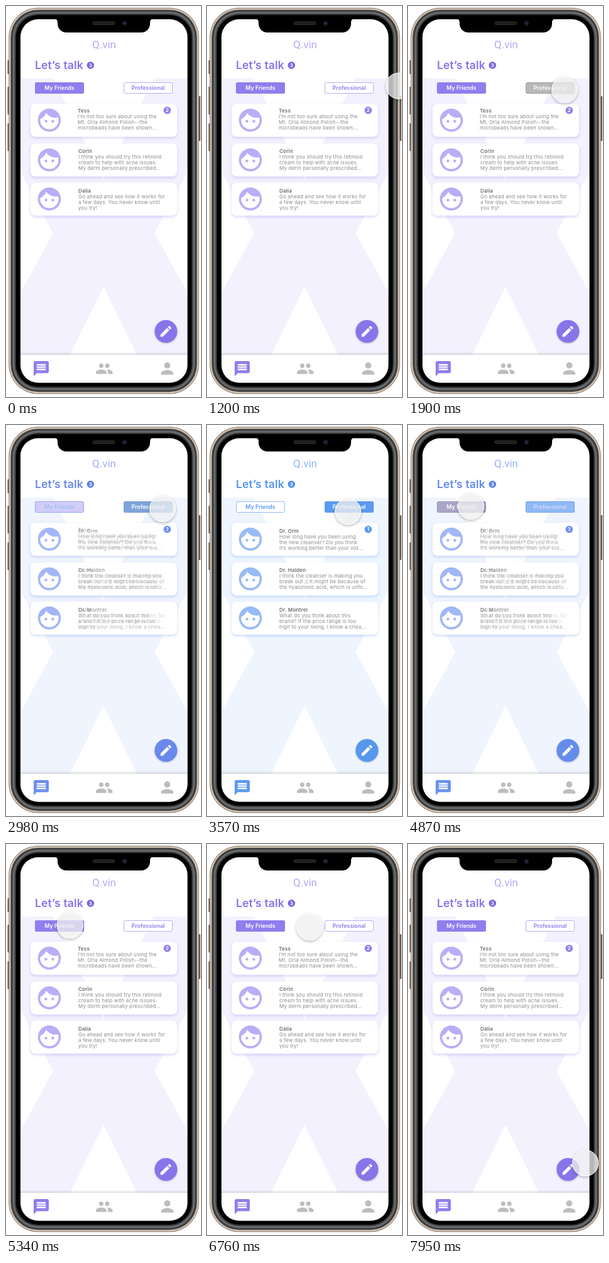
Recreate the animation shown at these times as an HTML page with a canvas. Size 310 by 620 pixels, loop 8 s.

```html
<!DOCTYPE html>
<html lang="en">
<head>
<meta charset="utf-8">
<title>Chat tabs</title>
<style>
  html, body { margin: 0; width: 100%; height: 100%; overflow: hidden; background: #fff; }
  canvas { display: block; width: 310px; height: 620px; }
</style>
</head>
<body>
<canvas id="stage"></canvas>
<script>
const W = 310, H = 620, LOOP = 8000;
const SANS = 'Inter, "Open Sans", sans-serif';
const scale = window.devicePixelRatio || 1;

const ICONS = {
  face: 'M9 11.75c-.69 0-1.25.56-1.25 1.25s.56 1.25 1.25 1.25 1.25-.56 1.25-1.25-.56-1.25-1.25-1.25zm6 0c-.69 0-1.25.56-1.25 1.25s.56 1.25 1.25 1.25 1.25-.56 1.25-1.25-.56-1.25-1.25-1.25zM12 2C6.48 2 2 6.48 2 12s4.48 10 10 10 10-4.48 10-10S17.52 2 12 2zm0 18c-4.41 0-8-3.59-8-8 0-.29.02-.58.05-.86 2.36-1.05 4.23-2.98 5.21-5.37C11.07 8.33 14.05 10 17.42 10c.78 0 1.53-.09 2.25-.26.21.71.33 1.47.33 2.26 0 4.41-3.59 8-8 8z',
  pencil: 'M3 17.25V21h3.75L17.81 9.94l-3.75-3.75L3 17.25zM20.71 7.04c.39-.39.39-1.02 0-1.41l-2.34-2.34c-.39-.39-1.02-.39-1.41 0l-1.83 1.83 3.75 3.75 1.83-1.83z',
  chat: 'M20 2H4c-1.1 0-2 .9-2 2v18l4-4h14c1.1 0 2-.9 2-2V4c0-1.1-.9-2-2-2zm-2 12H6v-2h12v2zm0-3H6V9h12v2zm0-3H6V6h12v2z',
  group: 'M16 11c1.66 0 3-1.34 3-3s-1.34-3-3-3-3 1.34-3 3 1.34 3 3 3zm-8 0c1.66 0 3-1.34 3-3S9.66 5 8 5 5 6.34 5 8s1.34 3 3 3zm0 2c-2.33 0-7 1.17-7 3.5V19h14v-2.5c0-2.33-4.67-3.5-7-3.5zm8 0c-.29 0-.62.02-.97.05C16.19 13.89 17 15.02 17 16.5V19h6v-2.5c0-2.33-4.67-3.5-7-3.5z',
  person: 'M12 12c2.21 0 4-1.79 4-4s-1.79-4-4-4-4 1.79-4 4 1.79 4 4 4zm0 2c-2.67 0-8 1.34-8 4v2h16v-2c0-2.66-5.33-4-8-4z'
};

const TABS = [{ label: 'My Friends', x: 46 }, { label: 'Professional', x: 187 }];
const CARD_Y = [155, 218, 280];

const THEMES = [{
  accent: '#8f7eed', title: '#8775ea', badge: '#7764dc', light: '#b9aef6',
  logo: '#b4a8f4', back: '#f3f1fe', shadow: 'rgba(130,110,235,.3)',
  unread: '2', nameY: [168.7, 232.7, 295.7], textX: [114, 115, 115],
  chats: [
    ['Tess', 'I’m not too sure about using the', 'Mt. Orla Almond Polish--the', 'microbeads have been shown...'],
    ['Corin', 'I think you should try this retinoid', 'cream to help with acne issues.', 'My derm personally prescribed...'],
    ['Dalia', 'Go ahead and see how it works for', 'a few days. You never know until', 'you try!']
  ]
}, {
  accent: '#5b9af0', title: '#5797ee', badge: '#4f90e8', light: '#97bcf6',
  logo: '#8db6f4', back: '#eef5fe', shadow: 'rgba(80,140,235,.3)',
  unread: '1', nameY: [170.5, 232.7, 295.7], textX: [115, 115, 115],
  chats: [
    ['Dr. Orm', 'How long have you been using', 'the new cleanser? Do you think', 'it’s working better than your old...'],
    ['Dr. Halden', 'I think the cleanser is making you', 'break out ;( It might be because of', 'the hyaluronic acid, which is unfo...'],
    ['Dr. Montrel', 'What do you think about this', 'brand? If the price range is too', 'high to your liking, I know a chea...']
  ]
}];

function makeCanvas(canvas) {
  canvas.width = W * scale;
  canvas.height = H * scale;
  const g = canvas.getContext('2d');
  g.scale(scale, scale);
  return g;
}

function box(g, x, y, w, h, r, fill, stroke) {
  g.beginPath();
  g.roundRect(x, y, w, h, r);
  if (fill) { g.fillStyle = fill; g.fill(); }
  if (stroke) { g.strokeStyle = stroke; g.lineWidth = 1; g.stroke(); }
}

function disc(g, x, y, r, fill) {
  g.beginPath();
  g.arc(x, y, r, 0, 7);
  g.fillStyle = fill;
  g.fill();
}

function poly(g, fill, ...pts) {
  g.beginPath();
  for (let i = 0; i < pts.length; i += 2) g.lineTo(pts[i], pts[i + 1]);
  g.fillStyle = fill;
  g.fill();
}

function text(g, str, x, y, font, fill, align = 'left', spacing = 0) {
  g.font = font;
  g.letterSpacing = spacing + 'px';
  g.textAlign = align;
  g.fillStyle = fill;
  g.fillText(str, x, y);
}

function icon(g, name, x, y, size, fill) {
  g.save();
  g.translate(x, y);
  g.scale(size, size);
  g.fillStyle = fill;
  g.fill(new Path2D(ICONS[name]), 'evenodd');
  g.restore();
}

function withShadow(g, color, blur, dy, draw) {
  g.save();
  g.shadowColor = color;
  g.shadowBlur = blur * scale;
  g.shadowOffsetY = dy * scale;
  draw();
  g.restore();
}

function badge(g, x, y, label, fill) {
  disc(g, x, y, 5.8, fill);
  text(g, label, x, y + 2.9, `700 8px ${SANS}`, '#fff', 'center');
}

function drawTab(g, theme, i, active, hover) {
  const { x, label } = TABS[i];
  if (active) box(g, x, 121, 78, 18, 2.5, theme.accent);
  else if (hover) box(g, x + .5, 121.5, 77, 17, 2.5, '#b8b8b8', '#9d9d9d');
  else box(g, x + .5, 121.5, 77, 17, 2.5, '#fff', theme.light);
  const ink = active || hover ? '#fff' : theme.accent;
  text(g, label, x + 39, 133.2, `600 8.8px ${SANS}`, ink, 'center');
}

function drawCard(g, theme, i) {
  const y = CARD_Y[i], x = theme.textX[i], base = theme.nameY[i];
  withShadow(g, theme.shadow, 4, 2, () => box(g, 39, y, 233, 52.5, 8, '#fff'));
  icon(g, 'face', 47, y + 4, 1.83, theme.light);
  const [name, ...lines] = theme.chats[i];
  text(g, name, x, base, `600 8px ${SANS}`, '#6c6c6c', 'left', .2);
  lines.forEach((line, k) =>
    text(g, line, x, base + 9.2 * (k + 1), `400 8px ${SANS}`, '#8a8a8a', 'left', .19));
}

function drawApp(g, mode, hover) {
  const theme = THEMES[mode];
  g.fillStyle = '#fff';
  g.fillRect(0, 0, W, H);
  g.fillStyle = theme.back;
  g.fillRect(23, 115, 266, 438);
  poly(g, '#fff', 75, 115, 235, 115, 155, 277);
  poly(g, '#fff', 102, 553, 208, 553, 155, 445);
  poly(g, '#fff', 23, 263, 75, 360, 23, 455);
  poly(g, '#fff', 289, 263, 236, 360, 289, 455);

  text(g, 'Q.vin', 156, 67, '400 17px Roboto, sans-serif', theme.logo, 'center');
  text(g, 'Let’s talk', 46, 100, `600 17.6px ${SANS}`, theme.title, 'left', .12);
  badge(g, 134.3, 94, '3', theme.badge);
  TABS.forEach((_, i) => drawTab(g, theme, i, i === mode, i === hover));
  CARD_Y.forEach((_, i) => drawCard(g, theme, i));
  badge(g, 256.3, 165.5, theme.unread, theme.accent);

  withShadow(g, 'rgba(0,0,0,.25)', 3, 1, () => disc(g, 254.3, 516, 18, theme.title));
  icon(g, 'pencil', 242.8, 504.5, .95, '#fff');

  withShadow(g, 'rgba(0,0,0,.22)', 4, -1, () => {
    g.fillStyle = '#fff';
    g.fillRect(15, 553, 282, 50);
  });
  icon(g, 'chat', 41.6, 560.6, 1.2, theme.accent);
  icon(g, 'group', 141.8, 560.8, 1.2, '#bdbdbd');
  icon(g, 'person', 241.7, 560.2, 1.22, '#bdbdbd');
}

function drawPhone(g) {
  for (const [x, y, h] of [[2.5, 86, 22], [2.5, 128, 44], [2.5, 186, 44], [305, 143, 71]])
    box(g, x, y, 4, h, 1, '#6b5e53');
  // Concentric bands from the metal rim to the black bezel
  const rings = [[4.3, '#85786c'], [5.3, '#d8cabb'], [7.2, '#7d7168'], [8.2, '#2f2d2c'],
                 [9.6, '#4c4f51'], [11, '#6b6f72'], [13, '#505355'], [14.5, '#2a2b2c'], [16, '#000']];
  for (const [d, color] of rings)
    box(g, d, d - 1.5, 311 - 2 * d, 621 - 2 * d, 51 - d, color);
}

function drawNotch(g) {
  g.beginPath();
  g.moveTo(77, 20);
  g.quadraticCurveTo(82, 21, 82, 26);
  g.arcTo(82, 42, 98, 42, 14);
  g.arcTo(229, 42, 229, 26, 14);
  g.lineTo(229, 26);
  g.quadraticCurveTo(229, 21, 234, 20);
  g.fillStyle = '#000';
  g.fill();
  box(g, 138, 25, 35, 4.5, 2.2, '#1d1c1b', '#35312d');
  disc(g, 188.5, 27.5, 4, '#14151d');
  disc(g, 188.5, 27.5, 2, '#252c52');
}

// Progress in held steps: the first step shows at t0, the last at t1.
function stepped(t, t0, t1, n) {
  if (t < t0) return 0;
  return Math.min(n, Math.floor((t - t0) * (n - 1) / (t1 - t0) + 1.001)) / n;
}

// start, end, steps, from x y, to x y, dip, easing power
const MOVES = [
  [1200, 1900, 7, 320, 125, 249, 133, 0, .8],
  [3570, 4160, 6, 249, 133, 100, 129, 10, 1],
  [5340, 5580, 3, 100, 129, 146, 131, 0, 3],
  [6180, 6530, 4, 146, 131, 161, 132, 0, 1],
  [6760, 7350, 6, 161, 132, 240, 132, 0, 2],
  [7830, 7950, 2, 324, 468, 282, 506, 0, 1]
];

function pointerAt(t) {
  const move = MOVES.filter(m => m[0] <= t).pop();
  if (!move || (t >= 7350 && t < 7830)) return null;
  const [t0, t1, n, x0, y0, x1, y1, dip, power] = move;
  const p = stepped(t, t0, t1, n) ** power;
  return { x: x0 + (x1 - x0) * p, y: y0 + (y1 - y0) * p + dip * Math.sin(Math.PI * p) };
}

function drawPointer(g, { x, y }) {
  const r = 21;
  g.save();
  g.beginPath();
  g.rect(0, 0, W, H);
  g.arc(x, y, r, 0, 7);
  g.clip('evenodd');
  withShadow(g, 'rgba(0,0,0,.3)', 4, 1.5, () => disc(g, x, y, r, '#fff'));
  g.restore();
  disc(g, x, y, r, 'rgba(240,240,240,.76)');
  g.beginPath();
  g.arc(x, y, r - .5, 0, 7);
  g.strokeStyle = 'rgba(255,255,255,.8)';
  g.lineWidth = 1;
  g.stroke();
}

const g = makeCanvas(document.getElementById('stage'));
const layer = document.createElement('canvas');
const lg = makeCanvas(layer);

function showApp(mode, hover, alpha) {
  if (alpha <= 0) return;
  drawApp(lg, mode, hover);
  g.globalAlpha = alpha;
  g.drawImage(layer, 0, 0, W, H);
  g.globalAlpha = 1;
}

function render(t) {
  const pointer = pointerAt(t);
  const hover = TABS.findIndex(({ x }) =>
    pointer && pointer.y < 160 && pointer.x > x && pointer.x < x + 78);
  const mix = stepped(t, 2740, 3090, 4) ** 1.7;
  const back = stepped(t, 4640, 4990, 4) ** 1.7;

  g.fillStyle = '#fff';
  g.fillRect(0, 0, W, H);
  drawPhone(g);
  g.save();
  g.beginPath();
  g.roundRect(23, 21, 265.5, 576.5, 28);
  g.clip();
  if (back > 0) {
    if (back < 1) showApp(1, hover, 1);
    showApp(0, hover, back);
  } else {
    if (mix < 1) showApp(0, hover, 1);
    showApp(1, hover, mix);
  }
  g.restore();
  drawNotch(g);
  if (pointer) drawPointer(g, pointer);
}

const start = performance.now();
function tick() {
  render((performance.now() - start) % LOOP);
  requestAnimationFrame(tick);
}
tick();
</script>
</body>
</html>
```
